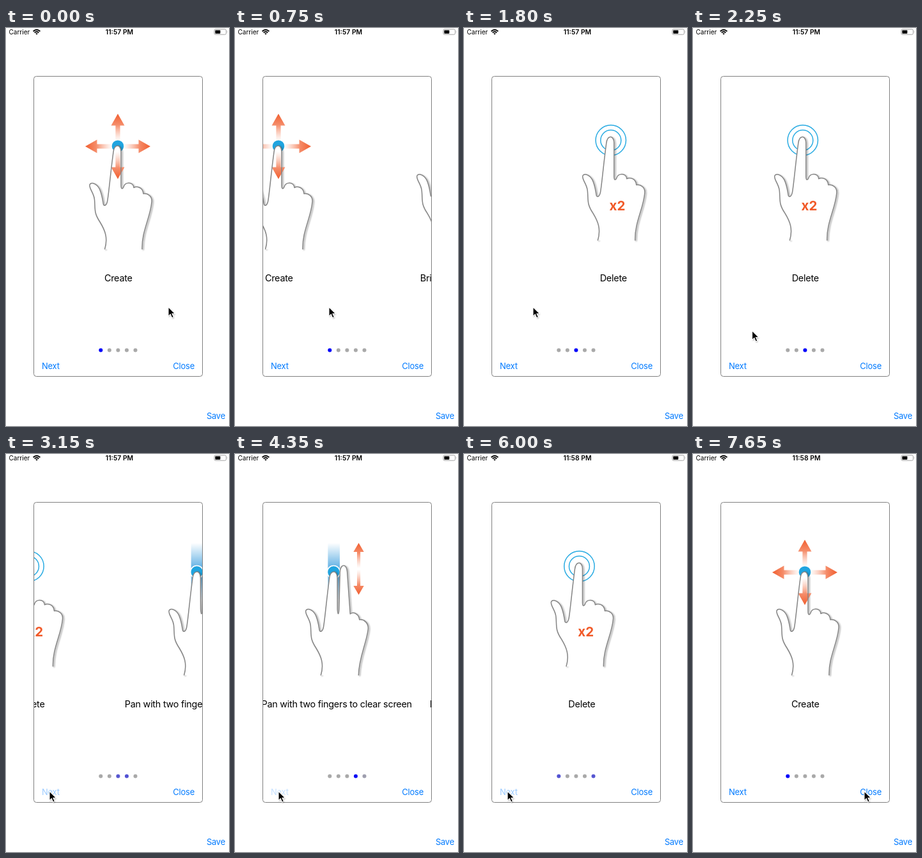
An HTML page for the animation above (8000 ms loop, 349 by 622 pixels).

```html
<!DOCTYPE html>
<html lang="en">
<head>
<meta charset="utf-8">
<title>Gesture guide</title>
<style>
  html, body { margin: 0; width: 100%; height: 100%; overflow: hidden; background: #fff; }
  svg { display: block; width: 100%; height: 100%; font-family: Inter, Roboto, sans-serif; }
  .label { font-size: 14.4px; letter-spacing: -.25px; text-anchor: middle; }
  .link { font-size: 13px; letter-spacing: -.25px; fill: #007aff; }
  .count { font-size: 20.5px; font-weight: 700; fill: #f15a29; text-anchor: middle; }
  .ring { fill: none; stroke: #29abe2; stroke-width: 1.5; }
  .line { fill: none; stroke: #858585; stroke-width: 1.5; stroke-linejoin: round; }
  .shade { fill: none; stroke: #000; stroke-opacity: .35; stroke-width: 2; }
</style>
</head>
<body>
<svg viewBox="0 0 349 622">
  <defs>
    <linearGradient id="heat" x1="0" y1="0" x2="0" y2="1">
      <stop offset="0" stop-color="#f15f30"/>
      <stop offset=".4" stop-color="#f58c69"/>
      <stop offset="1" stop-color="#f9b9a3" stop-opacity="0"/>
    </linearGradient>
    <linearGradient id="trail" x1="0" y1="0" x2="0" y2="1">
      <stop offset="0" stop-color="#4aa5e0" stop-opacity="0"/>
      <stop offset=".5" stop-color="#4aa5e0"/>
      <stop offset="1" stop-color="#4aa5e0" stop-opacity="0"/>
    </linearGradient>
    <filter id="soft" x="-20%" y="-20%" width="140%" height="140%"><feGaussianBlur stdDeviation="1.2"/></filter>
    <clipPath id="inside"><rect x="43.5" y="75.5" width="264" height="469" rx="4"/></clipPath>
  </defs>
  <rect width="349" height="622" fill="#fff"/>

  <text x="4.5" y="10.3" font-size="10">Carrier</text>
  <g fill="none" stroke="#000" stroke-width="1.9">
    <path d="M42.6 5.2Q48 .2 53.4 5.2"/>
    <path d="M44.7 7.4Q48 4.3 51.3 7.4"/>
  </g>
  <path d="M46.2 8.7Q48 7.2 49.8 8.7L48 10.6Z"/>
  <text id="clock" x="177.5" y="10.3" font-size="10.4" font-weight="600" text-anchor="middle"></text>
  <rect x="326" y="2" width="18.6" height="8.2" rx="2" fill="none" stroke="#999" stroke-width=".9"/>
  <rect x="327.4" y="3.4" width="8" height="5.4" rx=".8"/>
  <path d="M345.8 4.6Q347.4 6.1 345.8 7.6Z" fill="#999"/>

  <g clip-path="url(#inside)"><g id="strip"></g></g>
  <rect x="43.5" y="75.5" width="264" height="469" rx="4" fill="none" stroke="#808080"/>
  <g id="dots"></g>
  <text id="next" class="link" x="56" y="532.6">Next</text>
  <text class="link" x="295" y="532.6" text-anchor="end">Close</text>
  <text class="link" x="343" y="610.8" text-anchor="end">Save</text>

  <g id="cursor">
    <path d="M0 0V14.6L3.3 11.5L5.7 17L8.3 15.9L6 10.5H10.6Z" transform="translate(.8 1.4)" opacity=".35" filter="url(#soft)"/>
    <path d="M0 0V14.6L3.3 11.5L5.7 17L8.3 15.9L6 10.5H10.6Z" stroke="#fff" stroke-width="1.1"/>
  </g>
</svg>
<script>
const $ = id => document.getElementById(id);
const LOOP = 8000, STEP = 150, PAGE = 264, TAP = 192;

// Hands are drawn with the index fingertip near (175, 184).
const wrist = "M154.5 346C160 328 155 316 147 303C137 288 140 283 138.5 268" +
  "C137.5 257 129 250 131.2 244.5C134 240 142 244 146 251C150 259 151 267 152.3 275" +
  "C153.3 279 157 278 158.6 271C160.5 262 163.5 227 168 194";
const oneFinger = wrist +
  "C169.5 181 179.5 181 180 193L180 246C180 252 182.5 252 184 248.5C186 240 199 240 200 249.5" +
  "C204 247 214 248 215 259C222 258 229 263 228 272C226 296 212 318 213 346";
const twoFingers = wrist +
  "C169.5 181 180 181 180.3 193L180.5 243C181 252 182.6 252 183 243L184.5 185" +
  "C185 171 195 171 195.8 184L200.5 250C206 246 214 250 215 259C222 258 229.5 264 228.5 274" +
  "C226 296 214 318 213.5 346";

const hand = (d, inner = "") =>
  `<path class="shade" d="${d}" transform="translate(1.8 1.2)" filter="url(#soft)"/>
   <path d="${d}" fill="#fff"/>${inner}<path class="line" d="${d}"/>`;
const arrow = (x, y, turn, len, head, half, shaft, end) =>
  `<path fill="url(#heat)" transform="translate(${x} ${y}) rotate(${turn})"
    d="M0 ${-len}L${half} ${head - len}H${shaft}V${-end}H${-shaft}V${head - len}H${-half}Z"/>`;
const pan = turn => arrow(175, 185, turn, 51, 18.5, 10.5, 3.6, 8);
const dot = (x, y, r, extra = "") => `<circle cx="${x}" cy="${y}" r="${r}" fill="#20a4df" ${extra}/>`;
const ring = r => `<circle class="ring" cx="171.8" cy="175.5" r="${r}"/>`;
const label = s => `<text class="label" x="175.8" y="396">${s}</text>`;
const at = (x, y, s) => `<g transform="translate(${x} ${y})">${s}</g>`;
const taps = (n, name) => Array.from({ length: n }, (_, i) => ring(16 + 7.7 * i)).join("") +
  at(-3.2, -13.8, hand(oneFinger)) + `<text class="count" x="182" y="285">x${n}</text>` + label(name);

const pages = [
  [0, 90, 270].map(pan).join("") + dot(175, 184.7, 9.3) + hand(oneFinger, pan(180)) + label("Create"),
  taps(1, "Bring to front"),
  taps(2, "Delete"),
  `<rect x="162" y="139" width="18.6" height="90" fill="url(#trail)"/>` +
    dot(171, 184.5, 10, 'stroke="#fff" stroke-width="1.6"') + at(-3.6, 0, hand(twoFingers)) +
    [0, 180].map(a => arrow(210.2, 179.5, a, 40.5, 14, 8.2, 2.6, 1)).join("") +
    label("Pan with two fingers to clear screen"),
  arrow(175, 184, 40, 78, 18, 10.5, 3.6, 10) + arrow(133, 245, 220, 56, 18, 10.5, 3.6, 10) +
    dot(175, 184.7, 9.3) + dot(133, 245, 9.3) + hand(oneFinger) +
    label("Pinch with two fingers to resize item")
];
$("strip").innerHTML = pages.map((p, i) => at(i * PAGE, 0, p)).join("");
$("dots").innerHTML = pages.map((_, i) => `<circle cx="${148.3 + 13.55 * i}" cy="503.6" r="3"/>`).join("");
const dots = [...$("dots").children];

const swipe = [[450, 0], [600, 20], [750, 107], [900, 240], [1050, 264], [1500, 264],
  [1650, 339], [1800, 470], [1950, 522], [2100, 528]];
const pointer = [[450, 254, 436], [600, 234, 436], [750, 147, 436], [1050, 147, 436], [1500, 210, 436],
  [1650, 137, 436], [1800, 108, 436], [2100, 107, 438], [2400, 78, 508], [2550, 68, 527],
  [6900, 68, 527], [7050, 88, 538], [7200, 136, 551], [7350, 196, 552], [7500, 247, 539], [7650, 268, 527]];
const presses = [[3052, 2, 3], [4319, 3, 4], [5903, 4, 0]];

const clamp = v => Math.min(1, Math.max(0, v));
const ease = u => (1 - Math.cos(Math.PI * clamp(u))) / 2;
const mix = (a, b, p) => a + (b - a) * p;

function track(keys, t) {
  const i = keys.findIndex(k => k[0] > t);
  if (i < 0) return keys[keys.length - 1].slice(1);
  if (i === 0) return keys[0].slice(1);
  const a = keys[i - 1], b = keys[i], p = (t - a[0]) / (b[0] - a[0]);
  return a.slice(1).map((v, n) => mix(v, b[n + 1], p));
}

function draw(now) {
  const t = Math.floor((now % LOOP) / STEP) * STEP;
  let scroll = track(swipe, t)[0];
  let from = Math.round(scroll / PAGE), to = from, p = 1, fade = 1;
  const press = presses.filter(k => k[0] <= t).pop();
  if (press) {
    const dt = t - press[0];
    [, from, to] = press;
    p = ease(dt / TAP);
    scroll = PAGE * mix(from, to, p);
    fade = .2 + .8 * clamp((dt - 20) / 330);
  }
  $("strip").setAttribute("transform", `translate(${-scroll.toFixed(2)} 0)`);
  dots.forEach((c, i) => {
    const on = i === to ? p : i === from ? 1 - p : 0;
    const grey = mix(169, 0, on);
    c.setAttribute("fill", `rgb(${grey},${grey},${mix(169, 250, on)})`);
  });
  $("next").setAttribute("opacity", fade);
  $("clock").textContent = t < 4950 ? "11:57 PM" : "11:58 PM";
  const [x, y] = track(pointer, t);
  $("cursor").setAttribute("transform", `translate(${x} ${y})`);
}

function loop() {
  draw(performance.now());
  requestAnimationFrame(loop);
}
loop();
</script>
</body>
</html>
```
